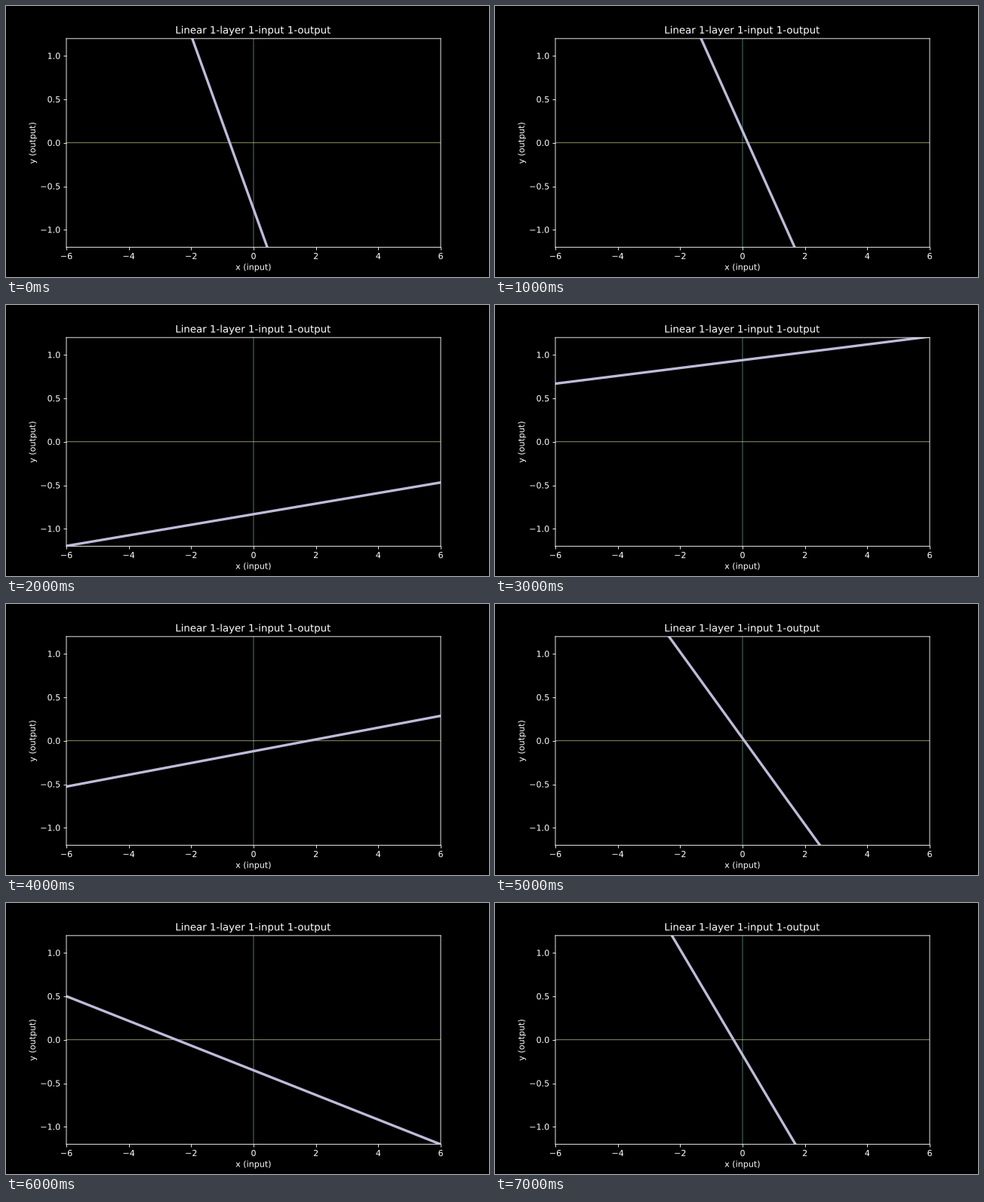
Write a matplotlib script that moves like this. It is 640x360 px and loops after 8 s.

```python
import numpy as np
import matplotlib.pyplot as plt
from matplotlib.animation import FuncAnimation
from matplotlib.patheffects import Normal

plt.style.use("dark_background")
plt.rcParams["path.snap"] = False  # soft, sub-pixel edges

# One random linear unit per second
WEIGHTS = [-0.998, -0.8, 0.0608, 0.0451, 0.0678, -0.496, -0.142, -0.606]
BIASES = [-0.761, 0.136, -0.832, 0.94, -0.119, 0.03, -0.35, -0.173]

fig, ax = plt.subplots(figsize=(8, 4.5), dpi=80)
ax.set(xlim=(-6, 6), ylim=(-1.2, 1.2), yticks=np.arange(-1, 1.1, 0.5),
       title="Linear 1-layer 1-input 1-output",
       xlabel="x (input)", ylabel="y (output)")
ax.axvline(0, color="C0", linewidth=0.5)
ax.axhline(0, color="C1", linewidth=0.5)

# Drawing text as outlines keeps its sub-pixel position
labels = [ax.title, ax.xaxis.label, ax.yaxis.label]
for text in labels + ax.get_xticklabels() + ax.get_yticklabels():
    text.set_path_effects([Normal()])

x = np.array([-6, 6])
line, = ax.plot(x, 0 * x, color="C2", linewidth=3)


def update(i):
    line.set_ydata(WEIGHTS[i] * x + BIASES[i])
    return line,


anim = FuncAnimation(fig, update, frames=len(WEIGHTS), interval=1000,
                     repeat=True, repeat_delay=0)
plt.show()
```
